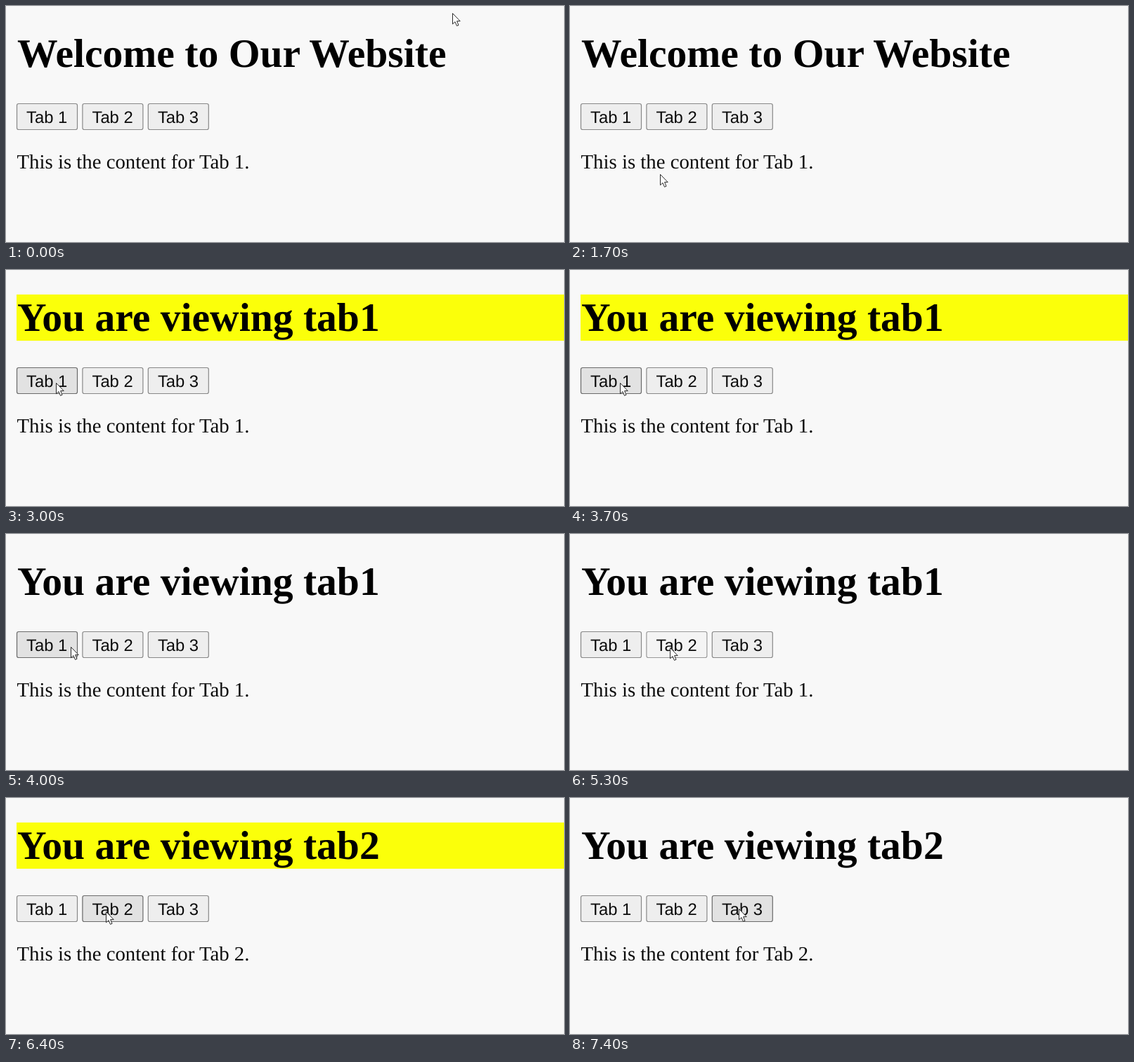
Recreate the animation shown at these times as an HTML page. Size 794 by 337 pixels, loop 8000 ms.

```html
<!DOCTYPE html>
<html lang="en">
<head>
<meta charset="utf-8">
<title>Tabs</title>
<style>
  html, body { margin: 0; width: 100%; height: 100%; overflow: hidden; background: #f8f8f8; }
  svg { display: block; width: 794px; height: 337px; }
  text {
    font-family: "Liberation Serif", "Times New Roman", serif; font-size: 28.8px;
    fill: #0c0c0c; text-rendering: geometricPrecision;
  }
  #heading { font-size: 57.6px; font-weight: bold; fill: #000; }
  .tab text { font-family: "Liberation Sans", Arial, sans-serif; font-size: 23.8px; }
  .tab rect { fill: #eee; stroke: #888; stroke-width: 1.2; }
  .tab.hover rect { fill: #e2e2e2; stroke: #6a6a6a; }
  .tab.active rect { fill: #f4f4f4; stroke: #999; }
</style>
</head>
<body>
<svg viewBox="0 0 794 337">
  <rect id="highlight" x="15" y="35" width="779" height="66" fill="#fbff0a"/>
  <text id="heading" x="16" y="87.2"></text>
  <g id="tabs"></g>
  <text id="content" x="15.5" y="231.6"></text>
  <path id="cursor" d="M.5 .5V15.8L4 12.6L6.5 18.4L9 17.3L6.6 11.6H11.2Z"
        fill="#fff" stroke="#2a2a2a" stroke-linejoin="round"/>
</svg>
<script>
const LOOP = 8000, STEP = 100;
const TAB = { x: 15.5, y: 139.5, width: 86, height: 37, pitch: 93.4 };

// Pointer waypoints: time, x, y
const path = [
  [0, 635, 10], [500, 493, 216], [1100, 493, 216], [1500, 225, 257], [1700, 128, 240],
  [1900, 55, 192], [2000, 37, 171], [2100, 55, 151], [2200, 71, 161], [3800, 71, 161],
  [4000, 92, 161], [4600, 142, 162], [6800, 142, 162], [7400, 240, 158], [LOOP, 240, 158]
];
const clicks = [
  { tab: 1, down: 2800, up: 3000 },
  { tab: 2, down: 5200, up: 5500 }
];
const HIGHLIGHT_TIME = 1000;

const byId = id => document.getElementById(id);
const tabX = n => TAB.x + (n - 1) * TAB.pitch;

byId("tabs").innerHTML = [1, 2, 3].map(n => `
  <g class="tab">
    <rect x="${tabX(n)}" y="${TAB.y}" width="${TAB.width}" height="${TAB.height}" rx="2.5"/>
    <text x="${tabX(n) + TAB.width / 2 - 0.3}" y="166.5" text-anchor="middle">Tab ${n}</text>
  </g>`).join("");
const tabs = [...document.querySelectorAll(".tab")];

function pointerAt(t) {
  const i = path.findIndex(point => point[0] > t);
  const [t0, x0, y0] = path[i - 1], [t1, x1, y1] = path[i];
  const k = (t - t0) / (t1 - t0);
  return [x0 + (x1 - x0) * k, y0 + (y1 - y0) * k];
}

function render(t) {
  const [x, y] = pointerAt(t);
  byId("cursor").setAttribute("transform", `translate(${x} ${y})`);

  const pressed = clicks.find(c => t >= c.down && t < c.up);
  tabs.forEach((tab, i) => {
    const dx = x - tabX(i + 1), dy = y - TAB.y;
    const inside = dx >= 0 && dx <= TAB.width && dy >= 0 && dy <= TAB.height;
    tab.classList.toggle("hover", inside);
    tab.classList.toggle("active", !!pressed && pressed.tab === i + 1);
  });

  const last = clicks.filter(c => t >= c.up).pop();
  byId("heading").textContent = last ? `You are viewing tab${last.tab}` : "Welcome to Our Website";
  byId("content").textContent = `This is the content for Tab ${last ? last.tab : 1}.`;
  const lit = last && t < last.up + HIGHLIGHT_TIME;
  byId("highlight").setAttribute("visibility", lit ? "visible" : "hidden");
}

const start = performance.now();
function tick() {
  const t = (performance.now() - start) % LOOP;
  render(Math.floor(t / STEP) * STEP);
  requestAnimationFrame(tick);
}
tick();
</script>
</body>
</html>
```
